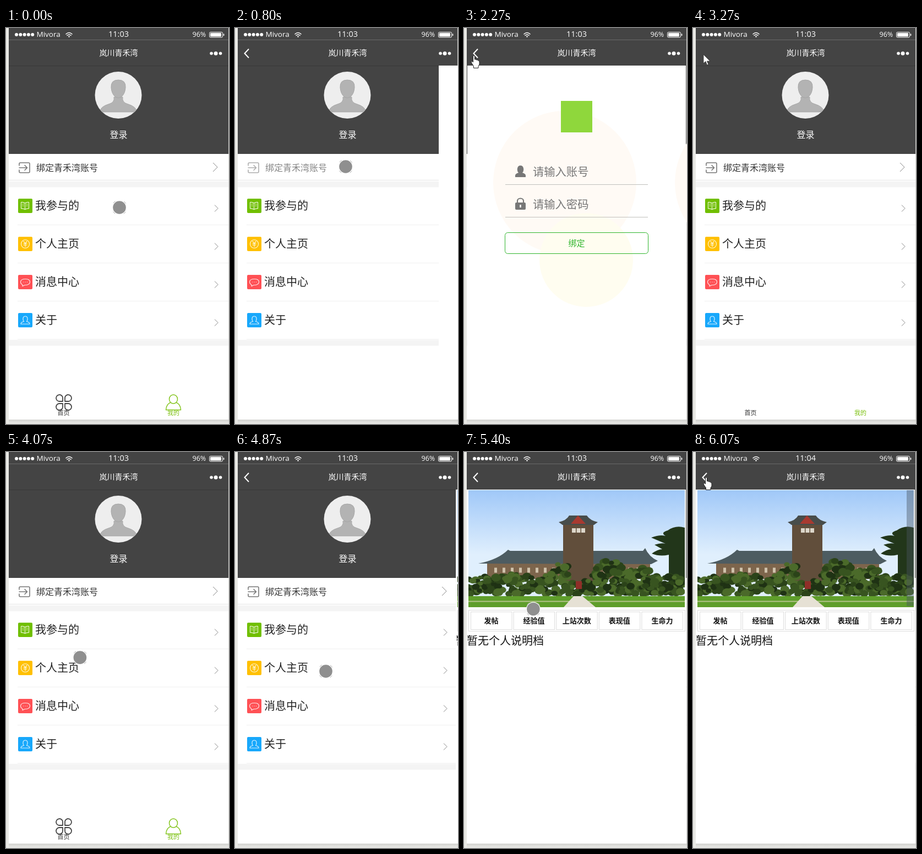
An HTML page that plays this animation: 405 px wide and 717 px high, repeating every 6140 ms.

```html
<!DOCTYPE html>
<html lang="zh">
<head>
<meta charset="utf-8">
<style>
  html, body { margin: 0; width: 100%; height: 100%; overflow: hidden; background: #e9e9e5; }
  svg { display: block; width: 100%; height: 100%; }
  text { font-family: "Noto Sans CJK SC", "Noto Sans CJK", sans-serif; }
  .latin { font-family: "Open Sans", sans-serif; font-weight: 500; fill: #fff; }
  .mid { text-anchor: middle; }
  .line { fill: none; stroke-linecap: round; stroke-linejoin: round; }
</style>
</head>
<body>
<svg viewBox="0 0 405 717">
  <defs>
    <clipPath id="screen"><rect x="5" y="68" width="400" height="641"/></clipPath>
    <clipPath id="avatarClip"><circle cx="204" cy="121.500" r="42.500"/></clipPath>
    <clipPath id="photoClip"><rect x="8" y="69" width="393" height="212"/></clipPath>
    <linearGradient id="sky" x2="0" y2="1">
      <stop stop-color="#a0c8f8"/><stop offset=".55" stop-color="#e0effd"/>
    </linearGradient>
    <linearGradient id="shade" x2="0" y2="1">
      <stop stop-color="#d2d2cf"/><stop offset="1" stop-color="#ebebe8"/>
    </linearGradient>
  </defs>

  <rect width="405" height="717" fill="#e9e9e5"/>
  <rect x="5" y="709" width="400" height="8" fill="url(#shade)"/>
  <rect x="5" width="399" height="709" fill="#fff"/>
  <path d="M404.500 0V709" stroke="#dededb"/>

  <g id="header">
    <rect x="5" width="399" height="68" fill="#444"/>
    <path d="M5 21.500H404" stroke="#6a6a6a"/>
    <g id="signal" fill="#fff"></g>
    <text class="latin" x="55.500" y="16" font-size="13.500">Mivora</text>
    <g class="line" stroke="#fff" stroke-width="1.500">
      <path d="M109 11Q114.500 6 120 11M111 13.500Q114.500 10.500 118 13.500"/>
      <circle cx="114.500" cy="15.500" r=".6"/>
    </g>
    <text id="clock" class="latin mid" x="204.500" y="16" font-size="14.500"></text>
    <text class="latin" x="338.500" y="16" font-size="12.500">96%</text>
    <rect x="369.500" y="7.500" width="24" height="9.500" rx="2" fill="none" stroke="#fff"/>
    <rect x="371" y="9" width="20" height="6.500" rx="1" fill="#fff"/>
    <path d="M395.500 10.500V14" stroke="#fff" stroke-width="1.500"/>
    <text class="mid" x="204.500" y="50.300" font-size="14" font-weight="500" fill="#fff">岚川青禾湾</text>
    <g fill="#fff"><circle cx="373" cy="46" r="2.800"/><circle cx="381" cy="46" r="3.500"/><circle cx="389.500" cy="46" r="2.800"/></g>
    <path id="back" d="M25 38L17.500 46L25 54" fill="none" stroke="#fff" stroke-width="2"/>
  </g>

  <g clip-path="url(#screen)">
    <g id="menu">
      <rect x="5" y="68" width="399" height="160" fill="#444"/>
      <path d="M5 68.500H404" stroke="#383838"/>
      <circle cx="204" cy="121.500" r="42.500" fill="#eee"/>
      <g clip-path="url(#avatarClip)" fill="#b3b3b3" stroke="#a5a5a5">
        <path d="M170 152Q172 142 186 138Q198 135 196 125H212Q210 135 222 138Q236 142 238 152Z"/>
        <path d="M191 108Q190 94 204 94Q218 94 217 108Q216 120 209 125Q204 128 199 125Q192 120 191 108Z"/>
      </g>
      <text class="mid" x="204.500" y="199" font-size="16" fill="#fff">登录</text>
      <g id="bindRow">
        <path class="line" d="M24 249V246Q24 244 26 244H41Q43 244 43 246V260Q43 262 41 262H26Q24 262 24 260V257M24 253H38M34 248.500L38.500 253L34 257.500" stroke="#777" stroke-width="1.600"/>
        <text x="55" y="259" font-size="16" fill="#333">绑定青禾湾账号</text>
        <path d="M376 244L384 252L376 260" fill="none" stroke="#888"/>
      </g>
      <path d="M5 275.500H404" stroke="#e6e6e6"/>
      <path d="M5 283H404M5 570H404" stroke="#f4f4f4" stroke-width="10.500"/>
      <g id="rows"></g>
    </g>

    <g id="tabs">
      <g id="tabIcons" class="line" stroke-width="1.800">
        <path d="M103 676H96.500A6 6 0 1 1 103 669.500ZM107 676V669.500A6 6 0 1 1 113.500 676ZM103 680V686A6 6 0 1 1 96.500 680ZM107 680H113.500A6 6 0 1 1 107 686Z" stroke="#444"/>
        <path d="M299 678Q291 681 290.500 691.500H317.500Q317 681 309 678M304 664A7.500 8 0 1 0 304 680A7.500 8 0 1 0 304 664" stroke="#85c520" stroke-width="1.500"/>
      </g>
      <text class="mid" x="104.500" y="701" font-size="11" fill="#333">首页</text>
      <text class="mid" x="304" y="701" font-size="11" fill="#7cc010">我的</text>
    </g>

    <g id="bindPage">
      <rect x="6" y="68" width="397" height="641" fill="#fff"/>
      <g fill="#fffaf5"><circle cx="183" cy="280" r="130"/><circle cx="513" cy="280" r="130"/></g>
      <circle cx="222" cy="420" r="85" fill="#fffdf0"/>
      <rect x="176" y="132" width="57" height="57" fill="#8fd73c"/>
      <g fill="#777">
        <path d="M93 270V267Q93 264 99 262Q96 259 97 254Q98 249 102.500 249Q107 249 108 254Q109 259 106 262Q112 264 112 267V270Z"/>
        <rect x="93" y="316" width="19" height="13" rx="2"/>
        <path d="M97 316V313A5.500 4.500 0 0 1 108 313V316" fill="none" stroke="#777" stroke-width="2.200"/>
        <path d="M102.500 320V325" stroke="#fff" stroke-width="2.500"/>
        <text x="125" y="268" font-size="20.300">请输入账号</text>
        <text x="125" y="326.500" font-size="20.300">请输入密码</text>
      </g>
      <path d="M75 283.500H334M75 342.500H334" stroke="#c0c0bc"/>
      <rect x="74.500" y="370.500" width="260" height="38" rx="5" fill="none" stroke="#2fb52c"/>
      <text class="mid" x="204.500" y="395" font-size="15" fill="#2fb52c">绑定</text>
    </g>

    <g id="homePage">
      <rect x="5" y="68" width="398" height="641" fill="#fff"/>
      <g clip-path="url(#photoClip)">
        <rect x="8" y="69" width="393" height="212" fill="url(#sky)"/>
        <path d="M42 200H338V230H42Z" fill="#7d654c"/>
        <path d="M26 202Q62 195 80 177L84 179H325L329 174Q336 190 352 197L340 203Z" fill="#4d5c61"/>
        <path d="M180 128H235V240H180Z" fill="#614e3b"/>
        <path d="M172 127Q186 124 191 115H223Q229 124 243 127L236 132H179Z" fill="#484d4b"/>
        <path d="M194 130L207 115L221 130Z" fill="#a83a30"/>
        <path d="M196 142H220" stroke="#dcd6ca" stroke-width="8" stroke-dasharray="7 1.500"/>
        <path d="M55 214H180M238 214H325" stroke="#cfc2ab" stroke-width="9" stroke-dasharray="5 10"/>
        <path d="M341 184Q352 176 360 176L346 168Q358 164 366 166L340 155Q356 149 366 152Q356 146 370 142Q384 132 401 137V240H372V186Q356 190 341 184Z" fill="#22361a"/>
        <g id="trees"></g>
        <path d="M8 261H401V281H8Z" fill="#5f9e2b"/>
        <path d="M8 270.500H401" stroke="#b4c48c" stroke-width="2"/>
        <path d="M203 234H214V248H203Z" fill="#8f2f28"/>
        <path d="M199 261H215L239 281H181Z" fill="#e6e1d5"/>
      </g>
      <rect id="overlay" x="388" y="69" width="13" height="210" fill="#48545f" opacity=".42"/>
      <rect x="8.500" y="286.500" width="393" height="38" fill="none" stroke="#ddd"/>
      <g id="cells"></g>
      <text x="5" y="349" font-size="20" fill="#111">暂无个人说明档</text>
    </g>
  </g>

  <g id="cursor">
    <g id="touch">
      <circle r="13" fill="#fff"/>
      <circle r="11.800" fill="#8f8f8f"/>
      <circle r="13.600" fill="none" stroke="#aaa" stroke-dasharray="5 16.360" stroke-dashoffset="-8.200"/>
    </g>
    <path id="arrow" d="M0 0V16L4 12.500L6.500 19L9 18L6.500 12H12Z" fill="#fff" stroke="#333" stroke-width=".8"/>
    <path id="hand" d="M-1.500 2Q0-.5 1.500 2V8Q3.500 6.500 4.500 9Q6.500 7.500 7.500 10Q9.500 9 10 12V17L8 20V23.500H-.5V20L-4.500 14Q-5.500 11-3.500 11L-1.500 13Z" fill="#fff" stroke="#222"/>
  </g>
</svg>
<script>
const $ = id => document.getElementById(id);
const show = (id, visible) => $(id).style.display = visible ? '' : 'none';

$('signal').innerHTML = [0, 1, 2, 3, 4].map(i => `<circle cx="${19 + i * 7.3}" cy="12" r="3"/>`).join('');

const menuItems = [
  ['我参与的', '#71bf00', 'M12.500 8V19.500Q9 17.500 5.500 18V6.500Q9 6 12.500 8Q16 6 19.500 6.500V18Q16 17.500 12.500 19.500M8 10H10M8 13H10M15 10H17M15 13H17'],
  ['个人主页', '#ffc000', 'M5.500 13A7.500 7.500 0 1 1 20.500 13A7.500 7.500 0 1 1 5.500 13M10 8.500L13 12L16 8.500M10 12.500H16M10 15H16M13 12V18'],
  ['消息中心', '#ff5155', 'M8 18Q4.500 16 4.500 12.500Q5 7.500 13 7.500Q21.500 7.500 21.500 13Q21 18.500 12 18.500L8 20.500ZM9.500 13H9.600M13 13H13.100M16.500 13H16.600'],
  ['关于', '#18a8fb', 'M5 20Q5 16.500 10.500 15.500Q8.500 13 9 9.500Q9.500 6 13 6Q16.500 6 17 9.500Q17.500 13 15.500 15.500Q21 16.500 21 20Z']
];
$('rows').innerHTML = menuItems.map(([label, color, glyph], i) => {
  const y = 309 + i * 69;
  return `<g transform="translate(0 ${y})">
    <rect x="22" width="26" height="26" rx="2" fill="${color}"/>
    <path class="line" transform="translate(22 0)" d="${glyph}" stroke="#fff" stroke-opacity=".85" stroke-width="1.200"/>
    <text x="53" y="20" font-size="20" fill="#222">${label}</text>
    <path d="M379 11.500L385 17.500L379 23.500" fill="none" stroke="#888"/>
    <path d="M21 47.500H404" stroke="#f0f0f0"/></g>`;
}).join('');

$('cells').innerHTML = ['发帖', '经验值', '上站次数', '表现值', '生命力'].map((label, i) => {
  const x = 12.5 + i * 77.6;
  return `<rect x="${x}" y="289.500" width="74.500" height="32" fill="none" stroke="#ddd"/>
    <text class="mid" x="${x + 37}" y="309.500" font-size="13" font-weight="bold" fill="#111">${label}</text>`;
}).join('');

// Foliage: small overlapping clumps below a treeline that dips at the door
function treeline(x) {
  const rise = (center, width, height) => height * Math.exp(-(((x - center) / width) ** 2));
  return 226 - rise(176, 20, 30) - rise(266, 30, 32) - rise(322, 18, 20) - rise(90, 25, 6) + rise(209, 10, 24);
}
let seed = 7;
const random = () => (seed = seed * 16807 % 2147483647) / 2147483647;
$('trees').innerHTML = Array.from({ length: 420 }, () => {
  const x = 8 + random() * 393, top = treeline(x);
  const y = top + random() * (258 - top), r = 4 + random() * 5;
  const fill = ['#1f3214', '#2b4319', '#385420', '#4b6a2a'][Math.floor(random() * 4)];
  return `<ellipse cx="${x}" cy="${y}" rx="${r}" ry="${r * 0.8}" fill="${fill}"/>`;
}).join('');

const LOOP = 6140, TICK = 200 / 3;

// Pointer path: time, x, y
const path = [
  [10, 206, 325], [140, 190, 285], [267, 201, 251],
  [1140, 201, 251], [1200, 200, 254], [1400, 119, 122], [1533, 110, 101], [1800, 134, 131],
  [2266, 18, 49], [3070, 18, 49], [3133, 19, 48],
  [3600, 19, 48], [4266, 166, 461], [4533, 165, 397],
  [4867, 165, 397], [5000, 168, 395], [5200, 168, 395],
  [5733, 35, 46], [5867, 35, 46], [6066, 24, 45]
];

function pointer(t) {
  const next = path.findIndex(p => p[0] > t);
  if (next === 0) return path[0].slice(1);
  if (next < 0) return path.at(-1).slice(1);
  const [t0, x0, y0] = path[next - 1], [t1, x1, y1] = path[next];
  const u = (t - t0) / (t1 - t0), k = u * u * (3 - 2 * u);
  return [x0 + (x1 - x0) * k, y0 + (y1 - y0) * k];
}

const slideIn = (t, start) => {
  const left = 1 - Math.min(1, Math.max(0, (t - start) / 230));
  return Math.floor(400 * left ** 3);
};

function placePage(id, t, start, end) {
  show(id, t >= start && t < end);
  $(id).setAttribute('transform', `translate(${slideIn(t, start)} 0)`);
}

function render(time) {
  // The screen refreshes 15 times a second
  const t = Math.min(91, Math.floor((time % LOOP + 4) / TICK)) * TICK;
  const back = t > 720 && t < 3250 || t > 4650;

  show('back', back);
  show('tabs', t < 720 || t > 3250 && t < 4720);
  show('tabIcons', t < 3250 || t > 3320);
  $('bindRow').setAttribute('opacity', t > 590 && t < 3250 ? 0.6 : 1);
  $('clock').textContent = t < 5520 ? '11:03' : '11:04';
  show('overlay', t > 5520);
  placePage('bindPage', t, 793, 3250);
  placePage('homePage', t, 4866, LOOP);

  const [x, y] = pointer(t);
  const shape = y > 68 ? 'touch' : back && x < 32 ? 'hand' : 'arrow';
  for (const id of ['touch', 'hand', 'arrow']) show(id, id === shape);
  $('cursor').setAttribute('transform', `translate(${x} ${y})`);
}

const began = performance.now();
(function loop() {
  render(performance.now() - began);
  requestAnimationFrame(loop);
})();
</script>
</body>
</html>
```
